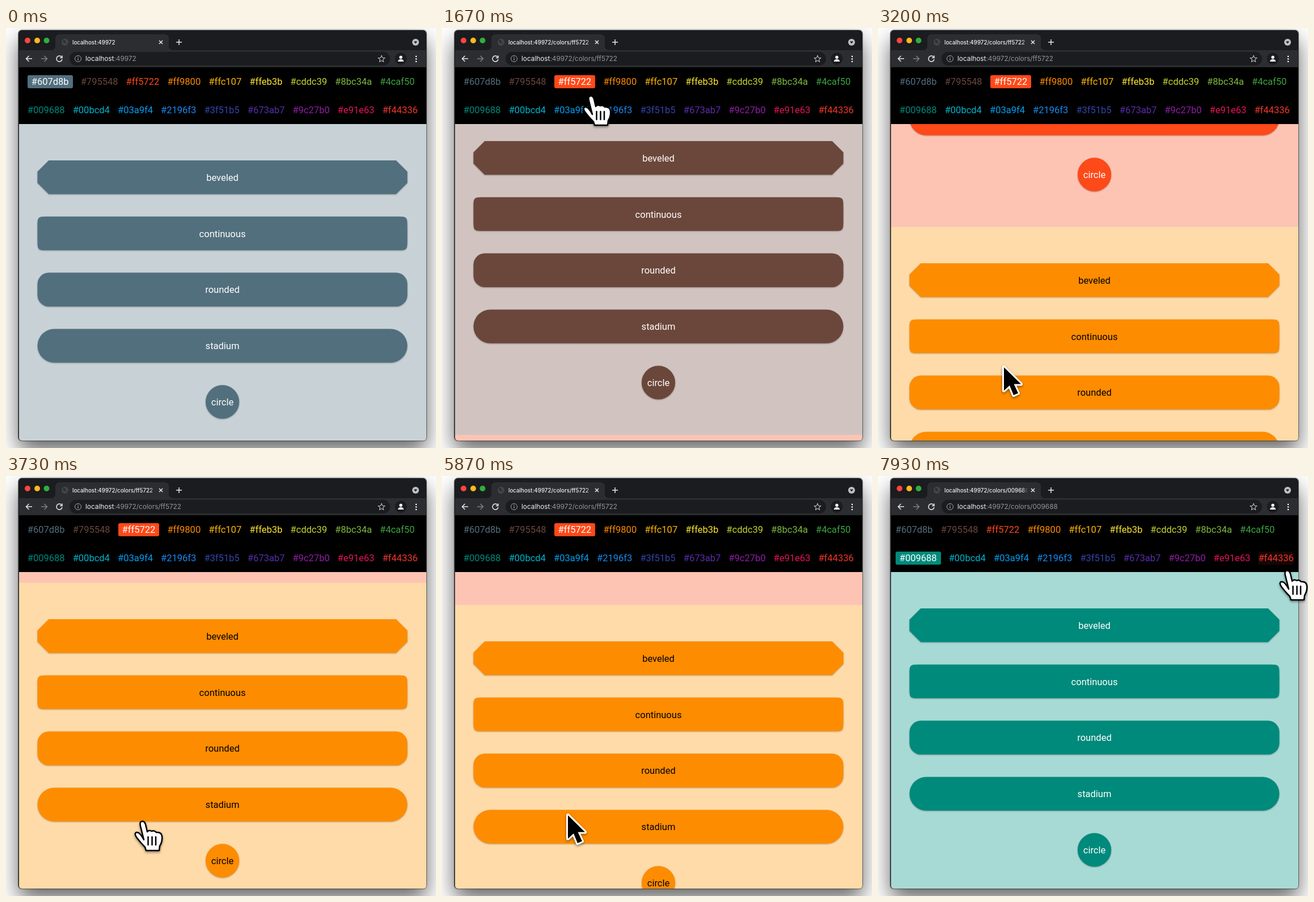
An HTML page for the animation above (8 s loop, 758 by 739 pixels).

```html
<!DOCTYPE html>
<html lang="en">
<head>
<meta charset="utf-8">
<title>Color sections</title>
<style>
  html, body { margin: 0; width: 100%; height: 100%; overflow: hidden; background: #fff; }
  body { position: relative; font: 16.5px Roboto, sans-serif; }
  svg, #window, #nav, #page, .section { position: absolute; }
  svg { left: 0; top: 0; overflow: visible; }
  #window { left: 22px; top: 4px; width: 719px; height: 722px; border-radius: 6px; background: #1b1c1f;
    box-shadow: 0 0 1px 1px rgba(0,0,0,.5), 0 18px 38px rgba(0,0,0,.62); }
  #nav { left: 23px; top: 69px; width: 717.5px; height: 100px; background: #000; display: flex; justify-content: center; }
  .row { display: flex; gap: 14.1px; height: 23px; margin: 14px 0 27px; line-height: 24px; }
  .row span { border-radius: 3px; white-space: pre; }
  #page { left: 23px; top: 169px; width: 717.5px; height: 556.5px; overflow: hidden; border-radius: 0 0 5px 5px; }
  .section { left: 0; top: 0; width: 100%; height: 581px; }
  .shape { filter: drop-shadow(0 1px 1px rgba(0,0,0,.3)); }
  .ui { font-family: Inter, sans-serif; }
  #cursor { filter: drop-shadow(0 2px 2px rgba(0,0,0,.45)); }
</style>
</head>
<body>
<div id="window"></div>
<svg id="chrome" width="758" height="739" fill="none">
  <path d="M23 39H740.5V69H23Z M79 39Q87 39 87 31V19Q87 11 95 11H279Q287 11 287 19V31Q287 39 295 39Z" fill="#2c2d31"/>
  <circle cx="38" cy="22" r="5" fill="#fc463d"/>
  <circle cx="55" cy="22" r="5" fill="#fdb81f"/>
  <circle cx="71.5" cy="22" r="5" fill="#31ae3f"/>
  <circle cx="104" cy="25" r="6" fill="#42474a"/>
  <path d="M100 22Q104 20 105 23T102 27Z M106 25L108 26L106 29Z" fill="#2c2d31"/>
  <rect x="112" y="42" width="565" height="24" rx="12" fill="#1b1c1f"/>
  <g stroke="#e6e8ea" stroke-width="1.5">
    <path d="M270 22L276 28M276 22L270 28M300 25H310M305 20V30"/>
    <path d="M46 54H35.500M40.500 49L35.500 54L40.500 59"/>
    <path d="M62 54H72.500M67.500 49L72.500 54L67.500 59" stroke="#7d7f83"/>
    <path d="M98 51A5 5 0 1 0 99 55M99 48.500V52.500H95"/>
    <path d="M662 48.500L663.700 52.200L667.700 52.700L664.700 55.400L665.500 59.300L662 57.300L658.500 59.300L659.300 55.400L656.300 52.700L660.300 52.200Z" stroke="#bfc1c4" stroke-width="1.100"/>
    <path d="M127 53V57M127 50.500V52" stroke="#a0a3a7" stroke-width="1.200"/>
  </g>
  <circle cx="127" cy="54" r="5.500" stroke="#a0a3a7"/>
  <circle cx="696" cy="54" r="10.500" fill="#1b1c1f"/>
  <g fill="#fff">
    <circle cx="696" cy="51.500" r="2.700"/>
    <path d="M691 59V58Q692 55 696 55T701 58V59Z"/>
    <circle cx="723" cy="50" r="1.300"/><circle cx="723" cy="54.500" r="1.300"/><circle cx="723" cy="59" r="1.300"/>
  </g>
  <circle cx="722" cy="25" r="6" fill="#bcbfc3"/>
  <path d="M719 23.500H725L722 27.500Z" fill="#1b1c1f"/>
  <defs>
    <linearGradient id="tabText" gradientUnits="userSpaceOnUse" x1="254" x2="264">
      <stop stop-color="#eceef0"/><stop offset="1" stop-color="#eceef0" stop-opacity="0"/>
    </linearGradient>
  </defs>
  <text id="tab" class="ui" x="117" y="28.500" font-size="9.750" font-weight="500" fill="url(#tabText)"></text>
  <text class="ui" x="140" y="58.300" font-size="11.800" fill="#f1f2f4">localhost<tspan id="path" fill="#94979b"></tspan></text>
</svg>
<div id="nav"><div id="links"></div></div>
<div id="page"></div>
<svg id="cursor" width="80" height="80" stroke-linejoin="round">
  <g id="arrow">
    <path d="M1 5V46L11 37L18 54L26 50.500L18.500 34.500H31Z" fill="#000" stroke="#fff" stroke-width="6" paint-order="stroke"/>
  </g>
  <g id="hand" stroke="#000" stroke-width="2.500" stroke-linecap="round">
    <path d="M22 48L16 24Q14 16 19 15.500Q23 15 25 21L28 34Q31 30 36 33Q40 31 44 35Q53 34 54 42Q55 51 50 59L49 67H26L24 61Q17 54 10 45Q4 37 9 35Q15 34 22 48Z" fill="#fff"/>
    <path d="M29.500 43V57M36.500 43V57M43 43V57"/>
  </g>
</svg>
<script>
const LOOP = 8000, SECTION = 581;
const colors = ('607d8b 795548 ff5722 ff9800 ffc107 ffeb3b cddc39 8bc34a 4caf50 ' +
  '009688 00bcd4 03a9f4 2196f3 3f51b5 673ab7 9c27b0 e91e63 f44336').split(' ');
const pale = 'cfd8dc d7ccc8 ffccbc ffe0b2 ffecb3 fff9c4 f0f4c3 dcedc8 c8e6c9 b2dfdb'.split(' ');
const $ = id => document.getElementById(id);

// The display profile darkens mid tones slightly.
const tone = hex => 'rgb(' + hex.match(/../g)
  .map(c => Math.round(254 * (parseInt(c, 16) / 255) ** 1.155)) + ')';
const ink = i => i >= 3 && i <= 8 ? '#000' : '#fff';

const L = 32.5, W = 652, H = 59.3, R = 19.8, MID = L + W / 2;
const rect = r => `<rect x="${L}" width="${W}" height="${H}" rx="${r}"/>`;
const shapes = {
  beveled: `<path d="M${L} ${R}l${R} ${-R}h${W - 2 * R}l${R} ${R}v${H - 2 * R}l${-R} ${R}h${2 * R - W}l${-R} ${-R}z"/>`,
  continuous: `<path d="M${L} ${R}c0 ${-R} 0 ${-R} ${R} ${-R}h${W - 2 * R}c${R} 0 ${R} 0 ${R} ${R}v${H - 2 * R}` +
    `c0 ${R} 0 ${R} ${-R} ${R}h${2 * R - W}c${-R} 0 ${-R} 0 ${-R} ${-R}z"/>`,
  rounded: rect(R),
  stadium: rect(H / 2),
  circle: `<circle cx="${MID}" cy="${H / 2}" r="${H / 2}"/>`
};

const sections = pale.map((bg, i) => {
  const el = document.createElement('div');
  el.className = 'section';
  el.style.background = tone(bg);
  el.innerHTML = '<svg width="718" height="581">' + Object.entries(shapes).map(([name, shape], k) =>
    `<g transform="translate(0 ${64 + 98.8 * k})"><g class="shape" fill="${tone(colors[i])}">${shape}</g>` +
    `<text x="${MID}" y="35.8" text-anchor="middle" fill="${ink(i)}">${name}</text></g>`).join('') + '</svg>';
  $('page').append(el);
  return el;
});

$('links').innerHTML = [colors.slice(0, 9), colors.slice(9)].map(row =>
  '<div class="row">' + row.map(c => `<span>#${c}</span>`).join('') + '</div>').join('');
const links = [...document.querySelectorAll('.row span')];

const smooth = u => u * u * (3 - 2 * u);
const linear = u => u;

// Keys are [time, ...values]; easeAt picks the easing for the segment starting at a time.
function track(keys, t, easeAt) {
  const n = keys.findIndex(k => k[0] > t);
  if (n < 0) return keys[keys.length - 1].slice(1);
  if (n === 0) return keys[0].slice(1);
  const a = keys[n - 1], b = keys[n];
  const u = easeAt(a[0])((t - a[0]) / (b[0] - a[0]));
  return a.slice(1).map((v, i) => v + (b[i + 1] - v) * u);
}

const FIRST = 560, SECOND = 1563, WHEEL = 2302, THIRD = 6640;
const scrollKeys = [[FIRST, 0], [1360, 581], [SECOND, 581], [WHEEL, 1162], [2600, 1307], [3200, 1562],
  [3800, 1745], [4400, 1809], [5100, 1760], [5870, 1685], [5970, 1680], [THIRD, 1680], [7440, 5229]];
const pointerKeys = [[60, 215, 745], [480, 140, 98], [1200, 140, 98], [1500, 243, 104], [1700, 243, 104],
  [2150, 221, 592], [5970, 221, 592], [6470, 66, 147], [7450, 66, 147], [7920, 702, 151]];

function selectedAt(t, scroll) {
  if (t < FIRST) return 0;
  if (t < SECOND) return 1;
  return t < THIRD ? Math.max(2, Math.floor(scroll / SECTION)) : 9;
}

function draw(t) {
  const [position] = track(scrollKeys, t, start => start >= WHEEL && start < THIRD ? linear : smooth);
  const scroll = Math.round(position);
  const [x, y] = track(pointerKeys, t, () => smooth);
  const selected = selectedAt(t, scroll);

  sections.forEach((el, i) => {
    const top = i * SECTION - scroll;
    el.style.display = top > -SECTION && top < 560 ? '' : 'none';
    el.style.transform = `translateY(${top}px)`;
  });

  links.forEach((el, i) => {
    const on = i === selected;
    el.style.padding = on ? '0 7px' : '0';
    el.style.color = on ? ink(i) : tone(colors[i]);
    el.style.background = on ? tone(colors[i]) : 'none';
  });
  links.forEach((el, i) => {
    const b = el.getBoundingClientRect();
    if (i !== selected && x > b.left && x < b.right && y > b.top && y < b.bottom)
      el.style.background = `#${colors[i]}18`;
  });

  const path = ':49972' + (t < FIRST ? '' : '/colors/' + colors[selected]);
  $('tab').textContent = 'localhost' + path;
  $('path').textContent = path;

  const hand = y < 169 || t > 6000 || (t > 3500 && t < 5000);
  $('hand').style.display = hand ? '' : 'none';
  $('arrow').style.display = hand ? 'none' : '';
  $('cursor').style.transform = `translate(${x}px, ${y}px)`;
}

function frame() {
  draw(performance.now() % LOOP);
  requestAnimationFrame(frame);
}
frame();
</script>
</body>
</html>
```
